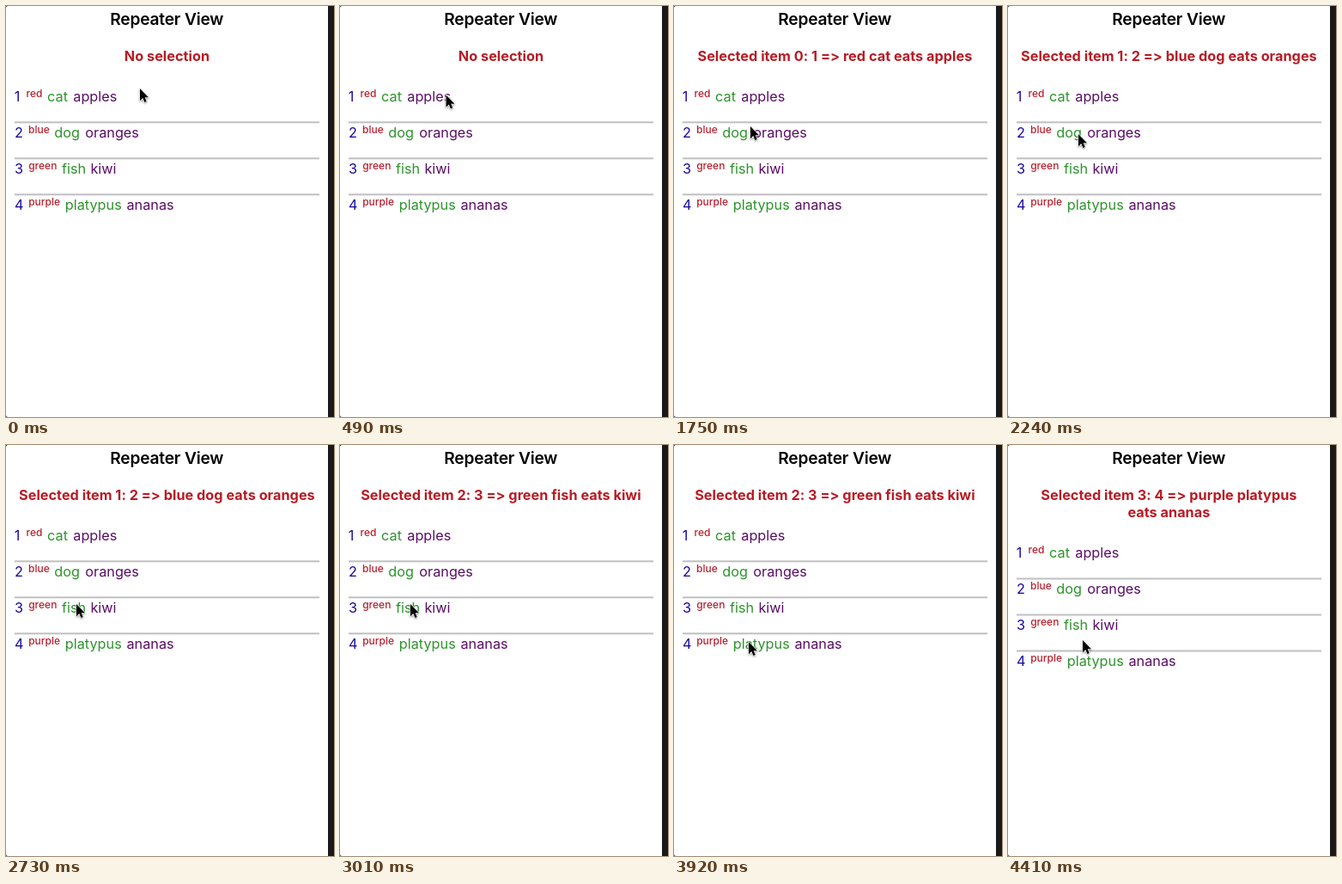
An HTML page that plays this animation: 382 px wide and 478 px high, repeating every 4.48 s.

```html
<!DOCTYPE html>
<html lang="en">
<head>
<meta charset="utf-8">
<title>Repeater View</title>
<style>
  html, body { margin: 0; width: 100%; height: 100%; overflow: hidden; background: #fff; }
  svg { display: block; width: 382px; height: 478px; }
  text {
    font-family: Inter, Roboto, sans-serif;
    font-size: 16.25px;
    font-variant-ligatures: none;
    font-feature-settings: "calt" 0;
    white-space: pre;
  }
  .title, .status { text-anchor: middle; }
  .title { font-size: 19.2px; font-weight: 600; letter-spacing: -.2px; fill: #000; }
  .status { font-size: 16.3px; font-weight: 700; fill: #b71c25; }
  .id { fill: #1b0a9e; }
  .color { font-size: 12px; font-weight: 500; fill: #b5212e; }
  .animal { fill: #2c942b; }
  .food { fill: #5a0d66; }
  .cursor { filter: drop-shadow(0 1px 1px rgba(0, 0, 0, .4)); }
</style>
</head>
<body>
<svg viewBox="0 0 382 478">
  <rect width="382" height="478" fill="#fff"/>
  <path d="M0 0H2.5Q0 0 0 2.5ZM0 478H2.5Q0 478 0 475.5Z" fill="#333"/>
  <rect x="375" width="7" height="478" fill="#19191a"/>
  <text class="title" x="187.2" y="22">Repeater View</text>
  <text class="status" x="187.4" y="64"></text>
  <text class="status" x="187.4" y="84.2"></text>
  <g id="list"></g>
  <path id="cursor" class="cursor" d="M0 0V14.2L3.3 11.1L5.4 16L7.8 15L5.7 10.2H10Z"
        fill="#000" stroke="#fff" stroke-width="1.2" stroke-linejoin="round" paint-order="stroke"/>
</svg>
<script>
const NS = "http://www.w3.org/2000/svg";
const LOOP = 4480, STEP = 70, ROW = 42, WRAP_SHIFT = 20.2;

// Each word is [text, x].
const rows = [
  [["1", 9.8], ["red", 23.6], ["cat", 48.1], ["apples", 78.3]],
  [["2", 10], ["blue", 26], ["dog", 56.3], ["oranges", 92.3]],
  [["3", 10], ["green", 26.2], ["fish", 65.1], ["kiwi", 98.4]],
  [["4", 10], ["purple", 26.2], ["platypus", 68.8], ["ananas", 140.5]]
];
const kinds = ["id", "color", "animal", "food"];

// Time at which each row gets selected.
const clicks = [1190, 2170, 2800, 4130];

// Pointer path: [time, x, y].
const path = [
  [0, 156, 96], [140, 154, 97], [420, 129, 102], [700, 107, 108], [840, 102, 110],
  [1470, 102, 110], [1750, 89, 140], [1960, 82, 149],
  [2310, 82, 149], [2590, 82, 185],
  [3010, 82, 185], [3150, 86, 229], [3360, 88, 242],
  [3500, 88, 242], [3850, 87, 229], [4340, 87, 229], [4410, 87, 227]
];

const list = document.getElementById("list");
const cursor = document.getElementById("cursor");
const status = document.querySelectorAll(".status");

function add(tag, attrs, text = "") {
  const el = document.createElementNS(NS, tag);
  for (const key in attrs) el.setAttribute(key, attrs[key]);
  el.textContent = text;
  list.append(el);
}

rows.forEach((words, i) => {
  const base = 110.8 + i * ROW;
  words.forEach(([text, x], k) =>
    add("text", { class: kinds[k], x, y: k === 1 ? base - 5 : base }, text));
  if (i) add("rect", { x: 10, y: 92.3 + i * ROW, width: 355, height: 2, fill: "#c0bfc1" });
});

function pointerAt(t) {
  const n = path.findIndex(p => p[0] > t);
  if (n < 0) return path[path.length - 1].slice(1);
  const [a, b] = [path[n - 1], path[n]];
  const u = (t - a[0]) / (b[0] - a[0]);
  return [1, 2].map(k => a[k] + (b[k] - a[k]) * u);
}

function statusLines(index) {
  if (index < 0) return ["No selection", ""];
  const [id, color, animal, food] = rows[index].map(word => word[0]);
  const head = `Selected item ${index}: ${id} => ${color} ${animal}`;
  const tail = `eats ${food}`;
  return index === 3 ? [head, tail] : [`${head} ${tail}`, ""];
}

function render(now) {
  const t = Math.floor((now % LOOP) / STEP) * STEP;
  const lines = statusLines(clicks.filter(c => c <= t).length - 1);
  status.forEach((el, i) => {
    if (el.textContent !== lines[i]) el.textContent = lines[i];
  });
  list.setAttribute("transform", `translate(0 ${lines[1] ? WRAP_SHIFT : 0})`);
  cursor.setAttribute("transform", `translate(${pointerAt(t)})`);
}

let start;
function tick(now) {
  start ??= now;
  render(now - start);
  requestAnimationFrame(tick);
}
render(0);
requestAnimationFrame(tick);
</script>
</body>
</html>
```
